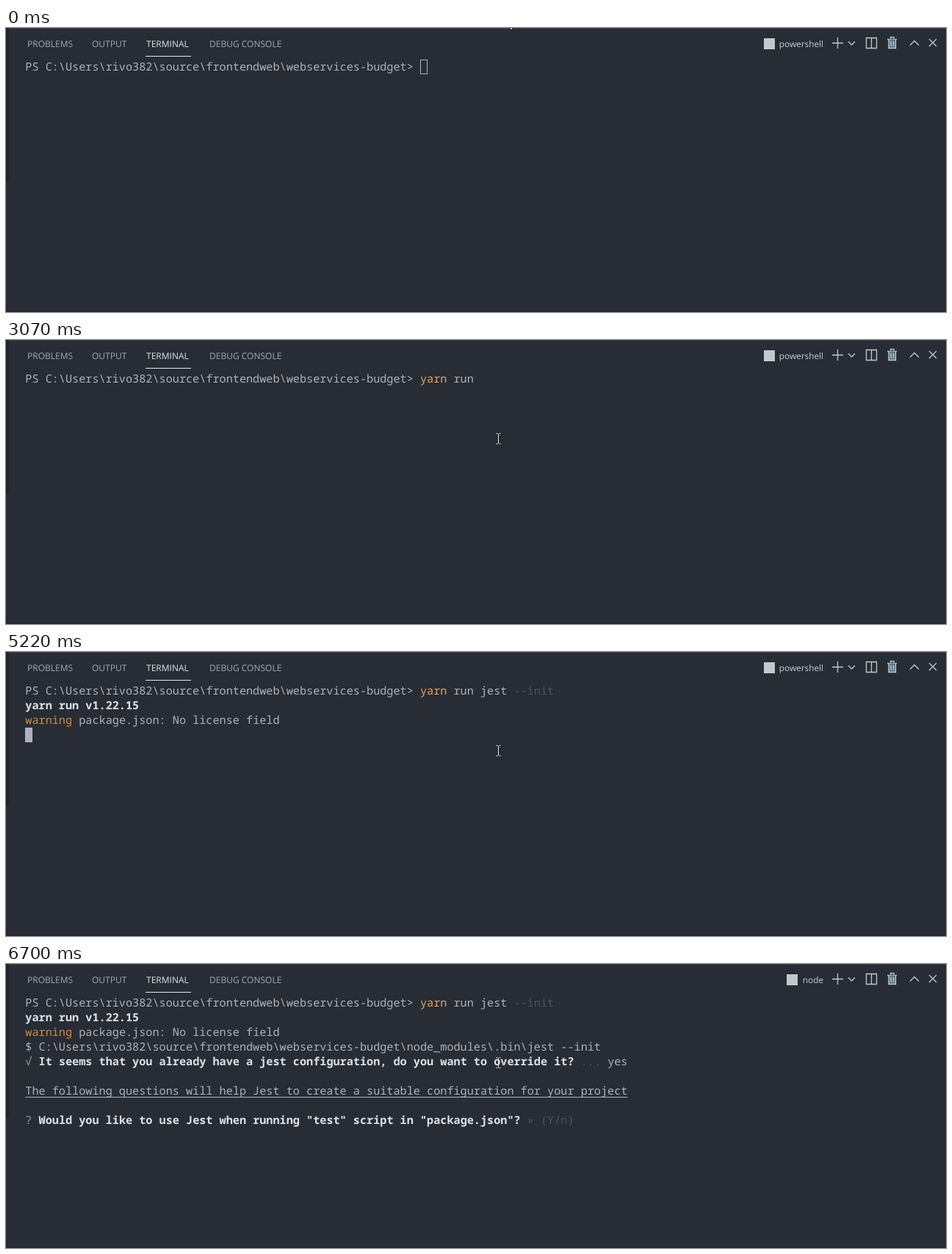
Recreate the animation shown at these times as an HTML page. Size 1280 by 387 pixels, loop 8000 ms.

```html
<!DOCTYPE html>
<html lang="en">
<head>
<meta charset="utf-8">
<title>Terminal</title>
<style>
html, body { margin: 0; width: 100%; height: 100%; overflow: hidden; background: #282c34; }
#stage { position: relative; width: 1280px; height: 387px; overflow: hidden; background: #282c34; }
#stage > * { position: absolute; }
.side { left: 0; top: 0; width: 4px; height: 210px; background: #21252b; }
.top { left: 4px; top: 0; right: 0; height: 1px; background: #40454f; }
.bottom { left: 0; top: 386px; right: 0; height: 1px; background: #23272e; }
.tab, #shell {
  top: 12px; line-height: 20px; white-space: pre; color: #a4a8b0;
  font-family: "Open Sans", "Noto Sans", sans-serif; font-size: 12px;
  text-rendering: geometricPrecision;
}
.tab.on { color: #e7e7e7; }
.under { left: 190px; top: 38px; width: 62px; height: 1px; background: #e7e7e7; }
#shell { right: 167px; font-size: 11.8px; color: #cccfd4; }
#mark { top: 14px; width: 15px; height: 15px; background: #c4c7cc; }
#screen {
  left: 26.3px; top: 43px; white-space: pre; color: #abb2bf;
  font: 500 15.2px/20px "Noto Sans Mono", "DejaVu Sans Mono", monospace;
  font-variant-ligatures: none; text-rendering: geometricPrecision;
}
#screen b { font-weight: 700; color: #dde0e6; }
#screen i { font-style: normal; color: #4e5460; }
#screen u { text-decoration: underline 1px; text-underline-offset: 3px; text-decoration-skip-ink: none; }
.cmd { color: #e5a556; }
.warn { color: #d18a45; }
.ask { color: #86a3a8; }
.ok { color: #94a389; }
#caret { width: 10px; height: 20px; box-sizing: border-box; border: 1px solid #abb2bf; }
#caret.block { background: #abb2bf; }
#caret.off { display: none; }
svg { left: 0; top: 0; }
</style>
</head>
<body>
<div id="stage">
  <div class="side"></div>
  <div class="top"></div>
  <div class="bottom"></div>
  <div class="tab" style="left:29px">PROBLEMS</div>
  <div class="tab" style="left:117px">OUTPUT</div>
  <div class="tab on" style="left:191px">TERMINAL</div>
  <div class="tab" style="left:277px">DEBUG CONSOLE</div>
  <div class="under"></div>
  <div id="mark"></div>
  <div id="shell"></div>
  <div id="caret"></div>
  <div id="screen"></div>
  <svg width="1280" height="387" fill="none" stroke="#c5c8cd" stroke-width="1.3">
    <path d="M1125 20.5h15M1132.5 13v15"/>
    <path d="M1147 18.5l4.5 4.5 4.5-4.5"/>
    <path d="M1171.5 13.5h14v14h-14zM1178.5 13.5v14"/>
    <g stroke="#b9cbd8">
      <path d="M1200 15.5h13M1204.5 15v-2.5h4.5v2.5"/>
      <path d="M1202 15.5v12h9.5v-12" fill="#5d7585"/>
      <path d="M1205 18v7M1208.5 18v7"/>
    </g>
    <path d="M1231 23.5l6-6 6 6"/>
    <path d="M1257 15l10 10M1267 15l-10 10"/>
    <path id="arrow" d="M0 0V16L4 12.5 6.5 18.5 9 17.5 6.5 11.5H12Z" fill="#fff" stroke="#111" stroke-width="1"/>
    <path id="beam" d="M-2.5 -6.5h2M1.5 -6.5h2M.5 -6v13M-2.5 7.5h2M1.5 7.5h2" stroke="#e6e6e6" stroke-width="1"/>
  </svg>
</div>
<script>
const LOOP = 8000, CELL = 9.12;
const $ = id => document.getElementById(id);

const path = 'C:\\Users\\rivo382\\source\\frontendweb\\webservices-budget';
const prompt = `PS ${path}> `;
const command = 'yarn run jest --init';

// Each track holds [start time, value...] entries.
const typed = [
  [0, 0], [1660, 1], [1730, 2], [1860, 4], [1930, 5], [2060, 6], [2130, 7], [2260, 8], [2330, 9],
  [3140, 11], [3340, 12], [3410, 13], [3610, 14], [4010, 15], [4070, 16],
  [4270, 17], [4410, 18], [4480, 19], [4620, 20]
];
const caretLook = [
  [0, 'hollow'], [990, 'block'], [1590, 'off'], [1660, 'block'], [3070, 'off'],
  [3140, 'block'], [3940, 'off'], [4010, 'block'], [5420, 'off']
];
const caretRow = [[0, 0], [5020, 1], [5220, 3], [5290, 4]];
const mouse = [
  [0, 681, -16], [660, 704, 18], [730, 713, 76], [800, 710, 122],
  [860, 692, 139], [990, 676, 137], [1060, 670, 134]
];

const ask = '<span class="ask">?</span>';
const hint = '<i>» (Y/n)</i>';
const override = '<b>It seems that you already have a jest configuration, do you want to override it?</b> ';
const answered = `<span class="ok">√</span> ${override}<i>...</i> yes`;
const started = ['<b>yarn run v1.22.15</b>', '<span class="warn">warning</span> package.json: No license field'];
const launched = [...started, `$ ${path}\\node_modules\\.bin\\jest --init`];
const output = [
  [0, []],
  [5220, started],
  [5290, launched],
  [5490, [...launched, `${ask} ${override}${hint}`]],
  [6630, [...launched, answered]],
  [6700, [...launched, answered, '',
    '<u>The following questions will help Jest to create a suitable configuration for your project</u>', '',
    `${ask} <b>Would you like to use Jest when running "test" script in "package.json"?</b> ${hint}`]]
];

function at(track, t) {
  let hit = track[0];
  for (const entry of track) if (entry[0] <= t) hit = entry;
  return hit.slice(1);
}

function commandLine(n) {
  const text = command.slice(0, n);
  return `${prompt.replace('>', '&gt;')}<span class="cmd">${text.slice(0, 4)}</span>` +
    `${text.slice(4, 14)}<i>${text.slice(14)}</i>`;
}

let shown = '';
function render(t) {
  const [count] = at(typed, t);
  const html = [commandLine(count), ...at(output, t)[0]].join('\n');
  if (html !== shown) $('screen').innerHTML = shown = html;

  const [row] = at(caretRow, t);
  const col = row ? 0 : prompt.length + count;
  const caret = $('caret');
  caret.className = at(caretLook, t)[0];
  caret.style.left = Math.floor(26 + col * CELL) + 'px';
  caret.style.top = 43 + row * 20 + 'px';

  const node = t >= 6300;
  $('shell').textContent = node ? 'node' : 'powershell';
  $('mark').style.left = (node ? 1063 : 1032) + 'px';

  const [x, y] = at(mouse, t);
  const overText = y > 40;
  $('arrow').style.display = overText ? 'none' : '';
  $('beam').style.display = overText ? '' : 'none';
  $(overText ? 'beam' : 'arrow').setAttribute('transform', `translate(${x} ${y})`);
}

const begin = performance.now();
function tick() {
  render((performance.now() - begin) % LOOP);
  requestAnimationFrame(tick);
}
tick();
</script>
</body>
</html>
```
